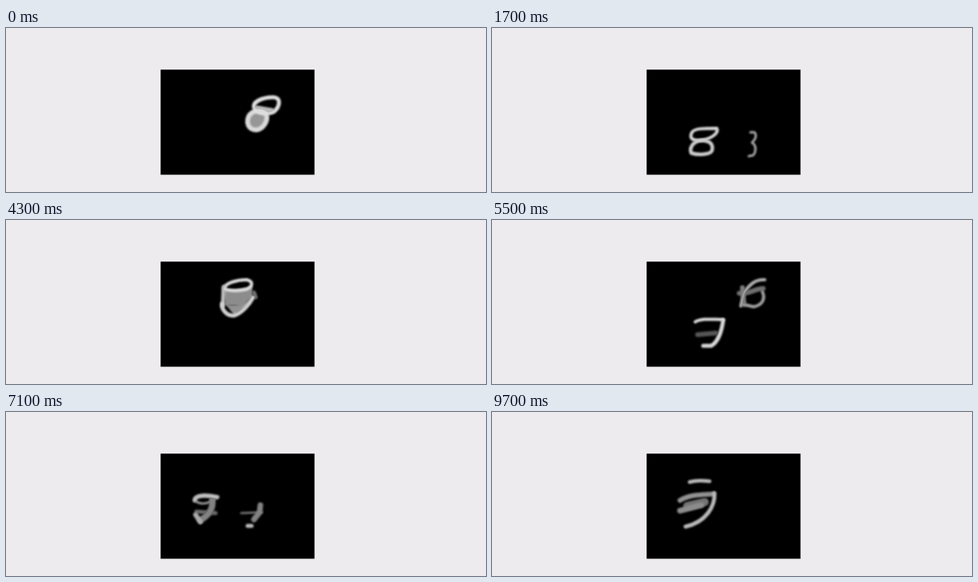
Recreate the animation shown at these times as an HTML page with a canvas. Size 600x206 px, loop 9900 ms.

```html
<!DOCTYPE html>
<html lang="en">
<head>
<meta charset="utf-8">
<title>Bouncing digits</title>
<style>
html, body { margin: 0; height: 100%; overflow: hidden; background: #edebee; }
canvas { display: block; }
</style>
</head>
<body>
<canvas width="600" height="206"></canvas>
<script>
const ctx = document.querySelector('canvas').getContext('2d');
const LOOP = 9900, FIRST = 300, STEP = 200;

// Waypoints are [step, value]; poses map a step to strokes [path, width, grey], width 0 fills.
const digits = [
  {
    x: [[0, 313], [8, 265], [11.5, 238], [13, 244], [21, 291], [27, 325], [28.5, 332], [35, 308], [42, 272], [48, 250]],
    y: [[0, 116], [8, 142], [11.5, 156], [13, 144], [21, 95], [25, 85], [27, 92], [30, 98], [35, 129], [39, 152], [42, 141], [48, 104]],
    poses: [
      [0, [
        ['M323 105C312 100 301 108 302 119C304 129 314 130 320 125C327 118 328 110 323 105Z', 0, 150],
        ['M323 105C312 100 301 108 302 119C304 129 314 130 320 125C327 118 328 110 323 105Z', 6, 218],
        ['M308 117L315 114', 4, 90]]],
      [8, [
        ['M262 141C248 142 247 137 250 131C253 126 264 126 281 126C284 132 274 139 262 141', 4, 215],
        ['M262 141C249 143 247 152 249 157C258 160 273 159 275 154C277 146 273 142 262 141', 4.5, 205]]],
      [13, [
        ['M246 141C244 133 247 127 254 126C260 127 260 134 257 140C253 143 249 143 246 141', 4.5, 175],
        ['M246 141C238 141 230 149 231 157C234 163 243 161 248 155C252 149 252 144 246 141', 5.5, 205]]],
      [21, [
        ['M272 86C280 88 298 87 308 82L308 96L296 108L274 107Z', 0, 140],
        ['M273 87C272 79 290 75 301 75C309 77 309 83 301 87C292 89 281 89 273 87', 4, 220],
        ['M272 84L271 108', 5, 190]]],
      [27, [
        ['M341 75C330 74 323 80 315 91L311 108', 4, 175],
        ['M309 92C320 94 329 86 339 86', 6, 110],
        ['M338 90C342 99 338 107 327 109L314 106', 4, 160],
        ['M313 85L315 106', 6, 125]]],
      [35, [
        ['M294 127L320 126', 3, 105],
        ['M318 117L317 126L310 135', 7, 130],
        ['M302 143L307 143', 5, 185]]],
      [48, [
        ['M247 88C253 86 264 86 272 87', 4.5, 185],
        ['M235 111C248 103 264 104 276 103', 6, 145],
        ['M244 118L266 113', 10, 115]]]
    ]
  },
  {
    x: [[0, 327], [2, 333], [8, 317], [13, 304], [21, 288], [27, 272], [35, 250], [40.5, 238], [42, 240], [48, 260]],
    y: [[0, 98], [6, 143], [7, 149], [8, 146], [13, 125], [18.5, 87], [21, 103], [27, 142], [29, 157], [30, 155], [35, 122], [41, 82], [42, 85], [48, 124]],
    poses: [
      [0, [
        ['M310 100C308 94 318 87 334 87C344 87 343 98 335 105C328 109 318 108 312 104', 5, 222],
        ['M314 101L332 104', 7, 185]]],
      [8, [
        ['M323 131L328 131C333 136 326 143 325 144C332 148 329 158 326 160L321 161', 3, 165]]],
      [13, [
        ['M289 113C300 110 312 109 319 109', 4, 220],
        ['M317 110C316 120 314 130 309 139L301 141', 6.5, 228],
        ['M289 127L309 126', 4.5, 165]]],
      [21, [
        ['M271 102C280 111 298 107 308 97L298 110L285 119Z', 0, 145],
        ['M270 105C269 112 276 121 285 120C295 117 304 106 309 97', 5, 210],
        ['M310 91L312 97', 5, 115]]],
      [27, [
        ['M254 128C262 123 276 125 289 125', 4, 215],
        ['M289 126C287 140 282 154 274 158L264 158', 5, 215],
        ['M257 144L280 142', 6, 85]]],
      [35, [
        ['M236 111C236 104 250 104 264 107', 5.5, 190],
        ['M236 110C240 117 252 116 260 110', 3, 145],
        ['M258 110C259 122 254 129 243 136', 8, 130],
        ['M238 125L262 127', 5, 105],
        ['M237 129L243 138', 6, 170]]],
      [48, [
        ['M278 102C279 118 268 138 242 144', 5, 185],
        ['M235 124L262 117', 7, 140]]]
    ]
  }
];

// Index of the segment containing n, and the fraction passed within it.
function locate(keys, n) {
  let i = 0;
  while (i < keys.length - 2 && n >= keys[i + 1][0]) i++;
  return [i, (n - keys[i][0]) / (keys[i + 1][0] - keys[i][0])];
}

function valueAt(keys, n) {
  const [i, f] = locate(keys, n);
  return keys[i][1] + f * (keys[i + 1][1] - keys[i][1]);
}

function drawPose(digit, [key, strokes], n, alpha) {
  ctx.save();
  ctx.globalAlpha = alpha;
  ctx.translate(valueAt(digit.x, n) - valueAt(digit.x, key), valueAt(digit.y, n) - valueAt(digit.y, key));
  for (const [d, width, grey] of strokes) {
    const path = new Path2D(d);
    ctx.fillStyle = ctx.strokeStyle = `rgb(${grey},${grey},${grey})`;
    ctx.lineWidth = width;
    if (width) ctx.stroke(path); else ctx.fill(path);
  }
  ctx.restore();
}

function drawDigit(digit, n) {
  const [i, f] = locate(digit.poses, n);
  const mix = Math.min(1, Math.max(0, f * 2 - 0.5));
  if (mix < 1) drawPose(digit, digit.poses[i], n, 1 - mix);
  if (mix > 0) drawPose(digit, digit.poses[i + 1], n, mix);
}

function frame() {
  const t = performance.now() % LOOP;
  const n = t < FIRST ? 0 : 1 + Math.floor((t - FIRST) / STEP);
  ctx.fillStyle = '#edebee';
  ctx.fillRect(0, 0, 600, 206);
  ctx.fillStyle = '#000';
  ctx.fillRect(193.3, 52.3, 192.3, 132);
  ctx.save();
  ctx.filter = 'blur(0.8px)';
  ctx.globalCompositeOperation = 'lighten';
  ctx.lineCap = ctx.lineJoin = 'round';
  for (const digit of digits) drawDigit(digit, n);
  ctx.restore();
  requestAnimationFrame(frame);
}
frame();
</script>
</body>
</html>
```
